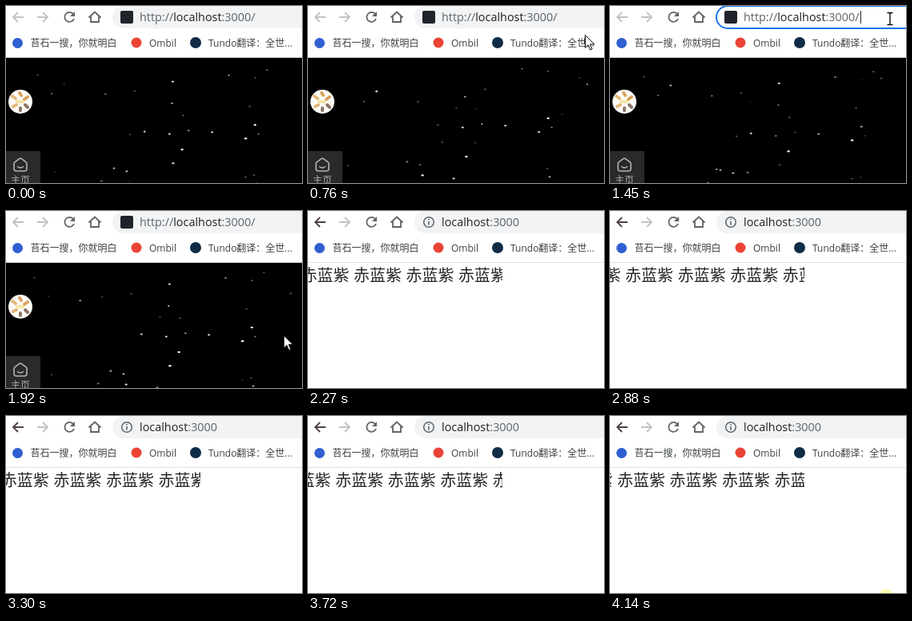
Write an HTML page that moves like this. It is 370x222 px and loops after 4210 ms.

```html
<!DOCTYPE html>
<html lang="zh">
<head>
<meta charset="utf-8">
<title>Browser marquee</title>
<style>
html, body { margin: 0; width: 370px; height: 222px; overflow: hidden; background: #fff; }
svg { display: block; }
text { white-space: pre; }
.url { font: 14.4px "Open Sans", "Noto Sans", sans-serif; fill: #5f6368; }
.host { fill: #202124; }
.mark { font: 12px "Open Sans", "Noto Sans CJK SC", "Noto Sans CJK", sans-serif; fill: #3c4043; }
.band { font: 20px "Liberation Sans", "Noto Sans CJK SC", "Noto Sans CJK", sans-serif; fill: #262626; }
.line { fill: none; stroke: #5f6368; stroke-width: 1.8; }
.idle { stroke: #c3c2c0; }
.ready { stroke: #4e3f46; }
</style>
</head>
<body>
<svg width="370" height="222" viewBox="0 0 370 222">
  <rect width="370" height="222" fill="#fff"/>

  <g id="night">
    <rect y="65" width="370" height="157" fill="#000"/>
    <g id="stars" fill="#fff"></g>
    <rect y="182" width="43" height="40" fill="#2a2a2a"/>
    <circle cx="18" cy="120" r="15" fill="#fdfbf7"/>
    <g stroke-linecap="round" stroke-width="4" fill="none">
      <path d="M8 113l4 3M9 126l4-2" stroke="#e3b878"/>
      <path d="M17 109l2 3M27 114l-4 3" stroke="#d9a25c"/>
      <path d="M18 131v-3M27 127l-3-3" stroke="#8d7768"/>
      <path d="M14 120h7" stroke="#f3e3a6"/>
    </g>
    <g fill="none" stroke="#b4b4b4" stroke-width="1.6" stroke-linecap="round" stroke-linejoin="round">
      <path d="M10 198q0-1.5 1.2-2.4l5.3-4q1.5-1 3 0l5.300 4q1.200.9 1.200 2.400v6q0 3-3 3h-10q-3 0-3-3z"/>
      <path d="M14.5 201.5q3.500 2.800 7 0"/>
    </g>
    <text class="mark" x="6" y="223" style="fill:#a9a9a9">主页</text>
  </g>

  <svg id="white" y="65" width="243" height="157">
    <text id="band" class="band" y="22.7"></text>
  </svg>
  <circle id="glow" cx="345" cy="228" r="10.500" fill="#ffffa8"/>

  <path d="M0 64.5H370" stroke="#dfe1e4"/>
  <g class="line">
    <path id="back" d="M22 14H9.5M15 8l-6 6 6 6"/>
    <path class="idle" d="M39 14h12.5M46 8l6 6-6 6"/>
    <path d="M84 10a6 6 0 1 0 1 6"/>
    <path d="M103.5 14.5l7.5-7 7.5 7M106 13v7h10v-7"/>
  </g>
  <path d="M86 7v6h-6z" fill="#5f6368"/>
  <rect id="pill" x="133" y="0" width="300" height="28" rx="14" stroke-width="2"/>
  <g id="longUrl">
    <rect x="143" y="6" width="16" height="16" rx="2" fill="#20232a"/>
    <text class="url" x="167" y="19">http://<tspan class="host">localhost</tspan>:3000/</text>
  </g>
  <g id="shortUrl">
    <circle class="line" cx="151" cy="14" r="6.3" style="stroke-width:1.5"/>
    <path d="M151 13v4.5M151 10v1.6" stroke="#5f6368" stroke-width="1.6"/>
    <text class="url" x="167" y="19"><tspan class="host">localhost</tspan>:3000</text>
  </g>
  <path id="caret" d="M313.5 6v16" stroke="#202124"/>

  <circle cx="14.5" cy="46.5" r="6.5" fill="#2f5fd0"/>
  <circle cx="163" cy="46" r="6.5" fill="#ea4335"/>
  <circle cx="237" cy="46" r="7" fill="#0f2b46"/>
  <text class="mark" x="30.5" y="51">苔石一搜，你就明白</text>
  <text class="mark" x="179" y="51">Ombil</text>
  <text class="mark" x="253" y="51">Tundo翻译：全世...</text>

  <path id="arrow" d="M0 0v16l3.700-3.500 2.600 6 2.400-1-2.600-5.900h5.200z" fill="#fff" stroke="#000"/>
  <path id="beam" d="M-3.5-7.5h2.500l1 1 1-1h2.500M0-6.500v13M-3.500 7.500h2.500l1-1 1 1h2.500" fill="none" stroke="#000" stroke-width="1.3"/>
</svg>
<script>
const LOOP = 4210, STEP = 69, LEAD = 24;             // ms
const FOCUS = 18, BLUR = 24, LOADED = 33, LAST = 60; // screen refreshes
const PERIOD = 65.56, SPEED = 4.21;                  // marquee, px and px per refresh

const $ = id => document.getElementById(id);
const show = (id, on) => { $(id).style.display = on ? '' : 'none'; };
const place = (node, x, y) => node.setAttribute('transform', `translate(${x} ${y})`);
const mix = (a, b, u) => a + (b - a) * u;

let seed = 11;
function random() {
  seed = (seed * 16807) % 2147483647;
  return seed / 2147483647;
}

const stars = Array.from({ length: 34 }, () => {
  const node = document.createElementNS('http://www.w3.org/2000/svg', 'ellipse');
  const light = mix(0.35, 1, random() ** 2);
  node.setAttribute('rx', 0.9 + light * 0.8);
  node.setAttribute('ry', 0.7 + light * 0.5);
  $('stars').append(node);
  return { node, light, x: mix(46, 385, random()), y: mix(92, 235, random()), phase: random() };
});

// Each star drifts up and left while it glows and fades.
function drawStars(step) {
  for (const { node, light, x, y, phase } of stars) {
    const life = (step / 24 + phase) % 1;
    node.setAttribute('opacity', light * Math.min(1, 1.5 * Math.sin(Math.PI * life)));
    place(node, x - 24 * life, y - 18 * life);
  }
}

// Pointer stops: the page edge, the bookmarks, the address field, off the bottom.
const stops = [
  { at: 8, x: 366, y: 130 }, { at: 11, x: 346.5, y: 36.5 }, { at: 14, x: 350, y: 16 },
  { at: BLUR, x: 350, y: 16 }, { at: 30, x: 346, y: 226 }
];
function drawPointer(step) {
  const i = stops.findIndex(s => step <= s.at);
  const on = i > 0;
  const a = stops[on ? i - 1 : 0], b = stops[on ? i : 0];
  const u = on ? (step - a.at) / (b.at - a.at) : 0;
  const x = mix(a.x, b.x, u), y = mix(a.y, b.y, u);
  const inField = y < 28;
  show('arrow', on && !inField);
  show('beam', on && inField);
  place($('arrow'), x, y);
  place($('beam'), x, y);
}

$('band').textContent = '赤蓝紫 '.repeat(9);

function draw(t) {
  const step = Math.min(LAST, Math.floor((t + LEAD) / STEP));
  const loaded = step >= LOADED;
  const focus = step >= FOCUS && step < BLUR;

  show('night', !loaded);
  show('white', loaded);
  show('longUrl', !loaded);
  show('shortUrl', loaded);
  show('caret', focus);
  show('glow', step === LAST);
  $('pill').setAttribute('fill', focus ? '#fff' : '#f1f3f4');
  $('pill').setAttribute('stroke', focus ? '#1a73e8' : 'none');
  $('back').setAttribute('class', loaded ? 'ready' : 'idle');

  if (loaded) place($('band'), 57 - 2 * PERIOD - SPEED * (step - LOADED), 0);
  else drawStars(step);
  drawPointer(step);
}

const start = performance.now();
function tick() {
  draw((performance.now() - start) % LOOP);
  requestAnimationFrame(tick);
}
tick();
</script>
</body>
</html>
```
